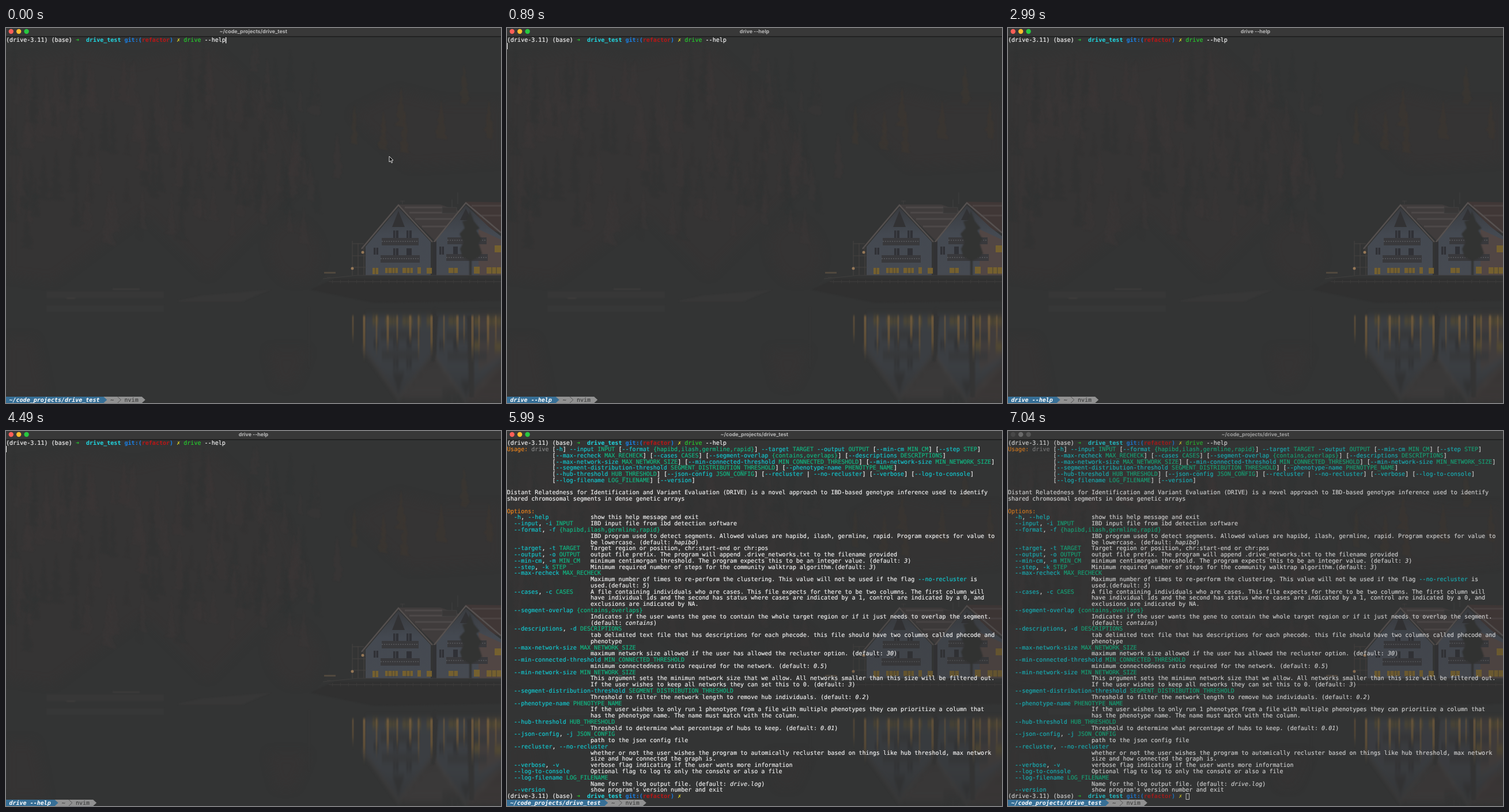
Recreate the animation shown at these times as an HTML page. Size 859 px wide and 652 px high, loop 7.06 s.

```html
<!DOCTYPE html>
<html lang="en">
<head>
<meta charset="utf-8">
<title>drive --help</title>
<style>
html, body { margin: 0; width: 100%; height: 100%; overflow: hidden; background: #333434; }
svg { display: block; width: 100%; height: 100%; }
text { font: 10.04px "DejaVu Sans Mono", monospace; text-rendering: geometricPrecision; fill: currentColor; stroke: currentColor; stroke-width: .18px; white-space: pre; }
#terminal { color: #f4f4f4; }
.title { font: 700 8.9px Inter, sans-serif; text-anchor: middle; color: #b9b9b9; stroke: none; }
.flag { color: #12c9d0; fill: currentColor; stroke: currentColor; }
.meta { color: #10b984; fill: currentColor; stroke: currentColor; }
.head { color: #ee851c; fill: currentColor; stroke: currentColor; }
.prog { color: #858585; fill: currentColor; stroke: currentColor; }
.value { font-style: italic; }
.arrow, .dir, .git, .branch, .dirty { font-weight: 700; stroke: none; }
.arrow { fill: #25c72c; }
.dir { fill: #20d8e2; }
.git { fill: #197fe4; }
.branch { fill: #bd1515; }
.dirty { fill: #e7df25; }
.cmd { color: #27cb2d; fill: currentColor; stroke: currentColor; }
.path { font-weight: 700; font-style: italic; color: #fff; stroke: none; }
.tab { color: #414141; }

.idle, .busy, .typed, .wait, .mouse, .output, .ready, .hollow, .focus, .lights, .photo {
  animation: 7060ms step-end infinite;
}
.idle { animation-name: idle; }
.busy { animation-name: busy; }
.typed { animation-name: typed; }
.wait { animation-name: wait; }
.mouse { animation-name: mouse; }
.output { animation-name: output; }
.ready { animation-name: ready; }
.hollow { animation-name: hollow; }
.focus { animation-name: focus; }
.lights { animation-name: lights; }
.photo { animation-name: photo; }
@keyframes idle { 0%, 84.844% { opacity: 1 } 2.124% { opacity: 0 } 100% { opacity: 1 } }
@keyframes busy { 0%, 84.844%, 100% { opacity: 0 } 2.124% { opacity: 1 } }
@keyframes typed { 0% { opacity: 1 } 2.124%, 100% { opacity: 0 } }
@keyframes wait {
  0%, 8.356%, 23.229%, 42.351%, 55.099%, 80.594%, 100% { opacity: 0 }
  2.124%, 12.606%, 29.603%, 48.725%, 63.597% { opacity: 1 }
}
@keyframes mouse {
  0% { transform: translate(665px, 223px); opacity: 1 }
  10.481% { transform: translate(662.5px, 217.5px); opacity: 1 }
  12.606%, 100% { transform: translate(662.5px, 217.5px); opacity: 0 }
}
@keyframes output { 0% { opacity: 0 } 84.844%, 100% { opacity: 1 } }
@keyframes ready { 0%, 99.716%, 100% { opacity: 0 } 86.968% { opacity: 1 } }
@keyframes hollow { 0% { opacity: 0 } 99.716%, 100% { opacity: 1 } }
@keyframes focus { 0% { opacity: 1 } 99.716%, 100% { opacity: .8 } }
@keyframes lights { 0% { filter: none } 99.716%, 100% { filter: grayscale(1) brightness(.55) } }
@keyframes photo { 0% { opacity: 1 } 84.844% { opacity: .76 } 99.716%, 100% { opacity: .86 } }
</style>
</head>
<body>
<svg viewBox="0 0 859 652" xmlns="http://www.w3.org/2000/svg">
  <defs color-interpolation-filters="sRGB">
    <filter id="soft"><feGaussianBlur stdDeviation="1.2"/></filter>
    <filter id="haze"><feGaussianBlur stdDeviation="9"/></filter>
    <filter id="ripple"><feGaussianBlur stdDeviation="1 5"/></filter>
    <filter id="glow" x="-50%" width="200%"><feGaussianBlur stdDeviation=".7 2"/></filter>
    <linearGradient id="streak" x1="0" y1="0" x2="0" y2="1">
      <stop offset="0" stop-color="#7a6140"/>
      <stop offset=".6" stop-color="#685438"/>
      <stop offset="1" stop-color="#4c463c" stop-opacity="0"/>
    </linearGradient>
    <linearGradient id="wall" x1="0" y1="0" x2="0" y2="1">
      <stop offset="0" stop-color="#393b3f"/>
      <stop offset=".4" stop-color="#444951"/>
      <stop offset="1" stop-color="#464a51"/>
    </linearGradient>
  </defs>
  <rect width="859" height="652" fill="#333434"/>

  <g class="photo">
    <g filter="url(#haze)" fill="#3a3535" opacity=".4">
      <path d="M0 60L140 40 220 60 350 30 480 150 520 260 450 330 350 430 240 320 80 440 0 430Z"/>
      <path d="M600 150L680 110 760 130 859 130V230L700 240Z"/>
      <path d="M455 372Q470 335 505 335 538 350 546 395 540 440 500 440 460 430 455 372Z"/>
      <path d="M0 540H50L70 640H0ZM455 560H525L500 620H470Z"/>
    </g>
    <g id="forest" filter="url(#soft)"></g>
    <g filter="url(#soft)">
      <path d="M70 458H274V470H70ZM298 474L340 465 460 455 440 463 410 476H300Z" fill="#373737"/>
      <path d="M70 482H274V494H70Z" fill="#363737"/>
      <path d="M185 453H232V455H185ZM105 469H120V471H105Z" fill="#403e3d"/>
      <path d="M528 455L570 436H859V474L640 478Z" fill="#303030"/>
      <path d="M526 485V590" stroke="#383736" fill="none"/>
    </g>
    <g id="houses">
      <path d="M681 307H754L786 318 746 372Z" fill="#403c3c"/>
      <path d="M692 312H757M700 321H764M710 332H775M722 345H764" stroke="#4d4848" stroke-width="3"/>
      <path d="M681 312L737 372V430H624V380Z" fill="url(#wall)"/>
      <path d="M617 384L681 308 740 372" fill="none" stroke="#55504f" stroke-width="2.5"/>
      <path d="M798 302L859 303V356L838 350Z" fill="#403736"/>
      <path d="M808 309H859M822 326H859" stroke="#4b4342" stroke-width="3"/>
      <path d="M798 308L838 346 859 362V430H747V368Z" fill="url(#wall)"/>
      <path d="M820 350L859 368V430H820Z" fill="#514644"/>
      <path d="M742 373L798 304 859 356" fill="none" stroke="#565150" stroke-width="2.5"/>
      <path d="M757 312H782V322H757ZM784 286V306M774 298V312" fill="#393737" stroke="#414040"/>
      <path d="M681 318L692 346H670ZM798 314L808 334H788ZM741 372H747V432H741Z" fill="#323234"/>
      <path d="M672 352h9v14h-9zM695 352h9v14h-9zM638 382h8v12h-8zM672 383h9v13h-9zM695 383h9v13h-9zM752 380h8v14h-8zM776 380h8v14h-8z" fill="#303136"/>
      <path d="M676 352V366M699 352V366M642 382V394M676 383V396M756 380V394" stroke="#4c5057"/>
      <path d="M652 365H716V378H652ZM650 395H718V408H650ZM766 364H834V376H766ZM764 393H836V405H764Z" fill="#39393c"/>
      <path d="M652 371H716M650 401H718M766 369H834M764 399H836" stroke="#505154" stroke-width="2" stroke-dasharray="2 2"/>
      <path d="M636 417h10v11h-10zM658 417h22v9h-22zM688 417h18v9h-18zM714 416h6v11h-6zM730 417h9v10h-9zM768 417h16v9h-16zM812 415h10v12h-10zM834 416h25v11h-25zM848 378h11v12h-11zM812 380h9v12h-9z" fill="#75602f"/>
      <path d="M641 417V428M663 417V428M670 417V428M675 417V428M695 417V428M701 417V428M777 417V428M843 416V428M851 416V428" stroke="#454039"/>
    </g>
    <path d="M805 318L812 336 822 348 816 352 826 368 820 374 826 392 818 400 808 404V440H804V404L792 398 788 384 794 372 787 358 796 348 792 336 800 334Z" fill="#323332" filter="url(#soft)"/>
    <path d="M601 370V430M611 374V430M621 380V430M601 375H621M601 396H625M601 416H625" stroke="#464341" fill="none"/>
    <path d="M684 301H692M688 300V306M550 436L610 430H859M560 441H859" stroke="#403f3e" fill="none"/>
    <path d="M560 433V441H859" stroke="#3b3a39" stroke-width="6" stroke-dasharray="1 13" fill="none"/>
    <g fill="#957757"><circle cx="619" cy="390" r="2.5"/><circle cx="601" cy="418" r="2.5"/><path d="M552 424H572V427H552Z" opacity=".3"/></g>
    <use href="#houses" transform="matrix(1 0 0 -1.18 0 1007)" opacity=".5" filter="url(#ripple)"/>
    <path d="M742 500H750L744 580H738ZM800 500H812V642H804Z" fill="#343434" filter="url(#soft)"/>
    <g id="streaks" fill="url(#streak)"></g>
  </g>

  <rect width="859" height="15" fill="#383838"/>
  <rect y="14.5" width="859" height="1" fill="#0e0e0e"/>
  <g class="lights">
    <circle cx="8.8" cy="6" r="4.2" fill="#fe5f57"/>
    <circle cx="22.2" cy="6" r="4.2" fill="#febc2e"/>
    <circle cx="35.6" cy="6" r="4.2" fill="#28c840"/>
  </g>
  <g class="focus">
    <g class="idle"><text class="title" x="429.3" y="9">~/code_projects/drive_test</text></g>
    <g class="busy"><text class="title" x="429.5" y="9">drive --help</text></g>
  </g>
  <g id="terminal">
    <g class="focus"><g id="prompt"></g><g id="output" class="output"></g></g>
    <g id="bars"></g>
    <g fill="#fff">
      <rect class="typed" x="381" y="16" width="1.3" height="10.5"/>
      <rect class="wait" x="0" y="26" width="1" height="11"/>
      <rect class="ready" x="308.5" y="630" width="1.3" height="10.8"/>
    </g>
    <rect class="hollow" x="309" y="630.5" width="5.4" height="10" fill="none" stroke="#c8c8c8" stroke-width=".9"/>
  </g>
  <g class="mouse">
    <path d="M0 0V10L2.4 7.9 4 11.6 5.7 10.8 4.1 7.3 7 7Z" fill="#171717" stroke="#eee" stroke-width=".9"/>
  </g>
</svg>
<script>
const CELL = 6.045, ROW = 10.77, BASELINE = 24.2;
const $ = id => document.getElementById(id);

function add(parent, name, attrs, content = '') {
  const node = document.createElementNS('http://www.w3.org/2000/svg', name);
  for (const key in attrs) node.setAttribute(key, attrs[key]);
  node.textContent = content;
  return parent.appendChild(node);
}

// Puts each token of a line on the character grid; regex groups choose its class.
function write(parent, row, col, line, pattern = /\S+/g, classes = []) {
  const text = add(parent, 'text', { y: BASELINE + row * ROW });
  for (const match of line.matchAll(pattern)) {
    const group = match.slice(1).findIndex(Boolean);
    add(text, 'tspan', { x: (col + match.index) * CELL, class: classes[group] || '' }, match[0]);
  }
}

const SYNTAX = /(--?[a-z][a-z-]*)|(\{.*?\}|[A-Z_]{4,})|(Usage:|Options:)|(drive)|\S/g;
const PROSE = /(--no-recluster)|((?<=default: )[^)]+)|\S+/g;
const PROMPT = /(➜)|(drive_test)|(git:\(|\)(?= ✗))|(refactor)|(✗)|(drive(?= --))|\(drive-3.11\)|\S+/g;

const syntax = (row, col, line) => write($('output'), row, col, line, SYNTAX, ['flag', 'meta', 'head', 'prog']);
const prose = (row, col, line) => write($('output'), row, col, line, PROSE, ['flag', 'value']);
const prompt = (parent, row, command) => write(parent, row, 0,
  '(drive-3.11) (base) ➜  drive_test git:(refactor) ✗ ' + command, PROMPT,
  ['arrow', 'dir', 'git', 'branch', 'dirty', 'cmd']);

const usage = [
  '[-h] --input INPUT [--format {hapibd,ilash,germline,rapid}] --target TARGET --output OUTPUT [--min-cm MIN_CM] [--step STEP]',
  '[--max-recheck MAX_RECHECK] [--cases CASES] [--segment-overlap {contains,overlaps}] [--descriptions DESCRIPTIONS]',
  '[--max-network-size MAX_NETWORK_SIZE] [--min-connected-threshold MIN_CONNECTED_THRESHOLD] [--min-network-size MIN_NETWORK_SIZE]',
  '[--segment-distribution-threshold SEGMENT_DISTRIBUTION_THRESHOLD] [--phenotype-name PHENOTYPE_NAME]',
  '[--hub-threshold HUB_THRESHOLD] [--json-config JSON_CONFIG] [--recluster | --no-recluster] [--verbose] [--log-to-console]',
  '[--log-filename LOG_FILENAME] [--version]'
];
const options = [
  ['-h, --help', 'show this help message and exit'],
  ['--input, -i INPUT', 'IBD input file from ibd detection software'],
  ['--format, -f {hapibd,ilash,germline,rapid}', 'IBD program used to detect segments. Allowed values are hapibd, ilash, germline, rapid. Program expects for value to', 'be lowercase. (default: hapibd)'],
  ['--target, -t TARGET', 'Target region or position, chr:start-end or chr:pos'],
  ['--output, -o OUTPUT', 'output file prefix. The program will append .drive_networks.txt to the filename provided'],
  ['--min-cm, -m MIN_CM', 'minimum centimorgan threshold. The program expects this to be an integer value. (default: 3)'],
  ['--step, -k STEP', 'Minimum required number of steps for the community walktrap algorithm.(default: 3)'],
  ['--max-recheck MAX_RECHECK', 'Maximum number of times to re-perform the clustering. This value will not be used if the flag --no-recluster is', 'used.(default: 5)'],
  ['--cases, -c CASES', 'A file containing individuals who are cases. This file expects for there to be two columns. The first column will', 'have individual ids and the second has status where cases are indicated by a 1, control are indicated by a 0, and', 'exclusions are indicated by NA.'],
  ['--segment-overlap {contains,overlaps}', 'Indicates if the user wants the gene to contain the whole target region or if it just needs to overlap the segment.', '(default: contains)'],
  ['--descriptions, -d DESCRIPTIONS', 'tab delimited text file that has descriptions for each phecode. this file should have two columns called phecode and', 'phenotype'],
  ['--max-network-size MAX_NETWORK_SIZE', 'maximum network size allowed if the user has allowed the recluster option. (default: 30)'],
  ['--min-connected-threshold MIN_CONNECTED_THRESHOLD', 'minimum connectedness ratio required for the network. (default: 0.5)'],
  ['--min-network-size MIN_NETWORK_SIZE', 'This argument sets the minimun network size that we allow. All networks smaller than this size will be filtered out.', 'If the user wishes to keep all networks they can set this to 0. (default: 3)'],
  ['--segment-distribution-threshold SEGMENT_DISTRIBUTION_THRESHOLD', 'Threshold to filter the network length to remove hub individuals. (default: 0.2)'],
  ['--phenotype-name PHENOTYPE_NAME', 'If the user wishes to only run 1 phenotype from a file with multiple phenotypes they can prioritize a column that', 'has the phenotype name. The name must match with the column.'],
  ['--hub-threshold HUB_THRESHOLD', 'Threshold to determine what percentage of hubs to keep. (default: 0.01)'],
  ['--json-config, -j JSON_CONFIG', 'path to the json config file'],
  ['--recluster, --no-recluster', 'whether or not the user wishes the program to automically recluster based on things like hub threshold, max network', 'size and how connected the graph is.'],
  ['--verbose, -v', 'verbose flag indicating if the user wants more information'],
  ['--log-to-console', 'Optional flag to log to only the console or also a file'],
  ['--log-filename LOG_FILENAME', 'Name for the log output file. (default: drive.log)'],
  ['--version', "show program's version number and exit"]
];

prompt($('prompt'), 0, 'drive --help');
syntax(1, 0, 'Usage: drive');
usage.forEach((line, i) => syntax(1 + i, 13, line));
prose(8, 0, 'Distant Relatedness for Identification and Variant Evaluation (DRIVE) is a novel approach to IBD-based genotype inference used to identify');
prose(9, 0, 'shared chromosomal segments in dense genetic arrays');
syntax(11, 0, 'Options:');
let row = 12;
for (const [name, ...lines] of options) {
  syntax(row, 2, name);
  if (name.length > 20) row++;
  for (const line of lines) prose(row++, 24, line);
}
prompt($('output'), row, '');

// Status bar: a path segment followed by two grey ones.
function statusBar(name, path) {
  const bar = add($('bars'), 'g', { class: name });
  const edge = path.length + 2, top = 641, mid = 646.5, end = 652;
  const x = col => col * CELL;
  const segment = (last, fill) => add(bar, 'path', {
    d: `M0 ${top}H${x(last)}L${x(last + 1)} ${mid} ${x(last)} ${end}H0Z`, fill
  });
  segment(edge + 11, '#919191');
  segment(edge, '#376f96');
  add(bar, 'path', {
    d: `M${x(edge + 4)} ${top}L${x(edge + 5)} ${mid} ${x(edge + 4)} ${end}`,
    fill: 'none', stroke: '#444', 'stroke-width': .8
  });
  const label = (col, text, type) => add(bar, 'text', { x: x(col), y: 649.8, class: type }, text);
  label(.9, path, 'path');
  label(edge + 2, '~', 'tab');
  label(edge + 6, 'nvim', 'tab');
}
statusBar('idle', '~/code_projects/drive_test');
statusBar('busy', 'drive --help');

let seed = 11;
const random = () => (seed = seed * 16807 % 2147483647) / 2147483647;

function conifer(x, top, height, fill, opacity) {
  const left = [], right = [];
  for (let y = 0; y < height; y += 5) {
    const reach = y * .13 + 1;
    left.unshift(`${x - reach * (.3 + random())} ${top + y}`);
    right.push(`${x + reach * (.3 + random())} ${top + y + 3}`);
  }
  add($('forest'), 'path', { d: `M${[...right, ...left].join('L')}Z`, fill, opacity });
}
for (let i = 0; i < 150; i++) {
  const x = random() * 540;
  conifer(x, 25 + random() * 300, 35 + random() * 55, i % 2 ? '#3c3737' : '#313232', .4);
}
for (const [x, top] of [[145, 60], [205, 52], [238, 172], [298, 104], [352, 38], [500, 180], [575, 184]])
  conifer(x, top, 80, '#3c3736', .5);
for (const [x, top] of [[605, 135], [686, 104], [655, 145], [755, 126], [795, 65], [838, 126], [692, 150]])
  conifer(x, top, 70, '#40382f', .45);

[602, 621, 643, 662, 679, 701, 716, 738, 760, 783, 795, 809, 821, 836, 850].forEach((x, i) =>
  add($('streaks'), 'rect', {
    x: x - 1.5, y: 500, width: 3 + i % 2, height: 52 + i * 29 % 36, opacity: .55 + i % 2 * .25, filter: 'url(#glow)'
  }));
</script>
</body>
</html>
```
